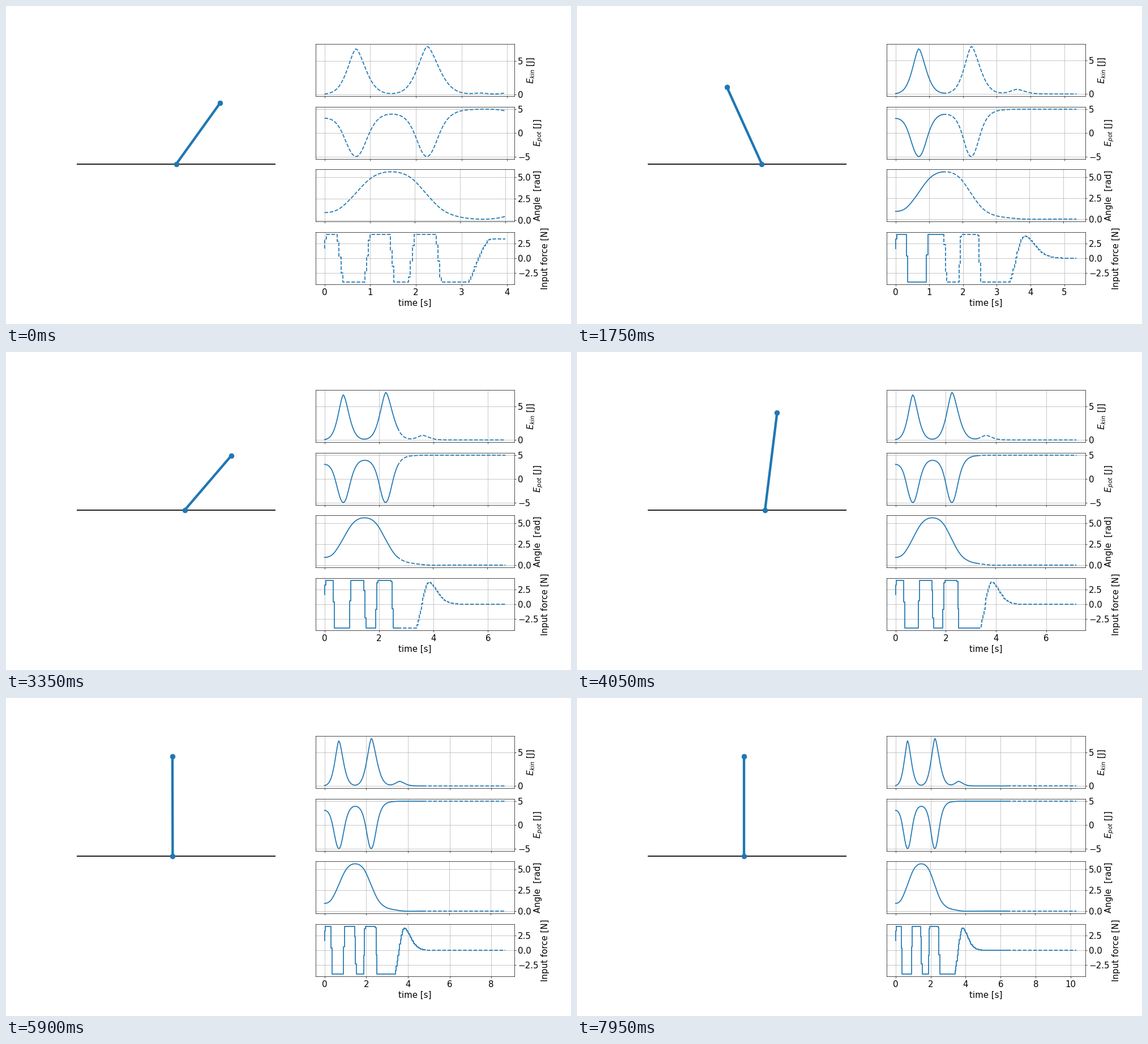
A matplotlib script that plays this animation: 998 px wide and 561 px high, repeating every 8000 ms.

```python
import numpy as np
import matplotlib.pyplot as plt
from matplotlib.animation import FuncAnimation

W, H, DPI = 998, 561, 64
K = 62.375 / DPI                 # the layout is sized for a 16 inch wide sheet
STEP, HORIZON, FRAMES = 0.04, 100, 160
BLUE = "#1f77b4"
TOP_ENERGY = 5.0
MAX_FORCE = 4.0
SWITCHES = (0.363, 0.955, 1.5, 1.928, 2.513)

plt.rcParams.update({
    "font.family": "DejaVu Sans",
    "axes.labelsize": 17.28 * K,
    "axes.labelpad": 4.5 * K,
    "axes.linewidth": 0.8 * K,
    "grid.linewidth": 0.8 * K,
    "xtick.labelsize": 17.28 * K,
    "ytick.labelsize": 17.28 * K,
    "xtick.major.pad": 4.5 * K,
    "ytick.major.pad": 3.5 * K,
})
for side in ("xtick", "ytick"):
    plt.rcParams[side + ".major.size"] = 3.5 * K
    plt.rcParams[side + ".major.width"] = 0.8 * K

# key poses: time, value, rate
ANGLE = [(0, .915, 0), (.385, 1.571, 4.2), (.69, 3.142, 5.7),
         (.985, 4.715, 4.2), (1.47, 5.61, 0), (1.92, 4.88, -3.9),
         (2.24, 3.142, -5.85), (2.525, 1.571, -4.6), (2.9, .53, -1.55),
         (3.4, .15, -.45), (4, -.018, -.02), (5, 0, 0)]
CART = [(0, 0, 0), (.69, .255, .9), (.88, .364, 0), (1.33, .26, 0),
        (1.84, .372, 0), (2.24, .21, -.85), (2.47, .09, 0), (3.1, .335, 0),
        (3.6, .175, -.65), (4.4, -.066, 0), (5, -.06, 0)]


def through(poses, t):
    """Cubic Hermite curve through the key poses."""
    p, v, m = np.array(poses).T
    t = np.clip(t, p[0], p[-1])
    i = np.clip(np.searchsorted(p, t) - 1, 0, len(p) - 2)
    h = p[i + 1] - p[i]
    s = (t - p[i]) / h
    return ((1 + 2 * s) * (1 - s) ** 2 * v[i] + s * (1 - s) ** 2 * h * m[i]
            + s * s * (3 - 2 * s) * v[i + 1] + s * s * (s - 1) * h * m[i + 1])


def bump(t, centre, height, left, right):
    width = np.where(t < centre, left, right)
    return height * np.exp(-(np.abs(t - centre) / width) ** 1.6)


def rise(t, start, length):
    p = np.clip((t - start) / length, 0, 1)
    return 1 - (1 - p ** 1.4) ** 2


def force_at(t, early):
    """Bang-bang force, softer in early plans, then a balancing push."""
    width = 0.07 + 0.05 * early
    u = np.minimum(MAX_FORCE, 1.65 + 40 * t)
    for k, centre in enumerate(SWITCHES):
        turn = np.clip((t - centre) / width + 0.5, 0, 1)
        u = u - (-1) ** k * 2 * MAX_FORCE * turn
    fade = np.exp(-(np.maximum(t - 3.86, 0) / 0.42) ** 1.7)
    push = (7.78 * rise(t, 3.4, 0.46) - MAX_FORCE) * fade
    early_push = 7.25 * rise(t, 3.16, 0.52) - MAX_FORCE
    last = (1 - early) * push + early * early_push
    return np.where(t < 3, u, last)


def plan_at(t, early):
    """Energies, angle and force as planned; early=0 is what really happens."""
    angle = through(ANGLE, t) + early * (np.clip(t, 3.3, 4.1) - 3.3) ** 2
    swings = bump(t, .69, 6.8, .264, .295) + bump(t, 2.25, 7.15, .299, .355)
    wobble = bump(t, 3.6, .7, .28, .33)
    early_wobble = bump(t, 3.4, .2, .2, .25) + bump(t, 4.1, .4, .2, .2)
    kinetic = swings + (1 - early) * wobble + early * early_wobble
    return [kinetic, TOP_ENERGY * np.cos(angle), angle, force_at(t, early)]


T = np.arange(FRAMES + HORIZON + 1) * STEP
done = plan_at(T, 0)
cart = through(CART, T)

fig = plt.figure(figsize=(W / DPI, H / DPI), dpi=DPI, facecolor="white")
grid = fig.add_gridspec(4, 2, left=.125, right=.9, top=.88, bottom=.125)

stage = fig.add_subplot(grid[:, 0])
stage.set(xlim=(-1.8, 1.8), ylim=(-1.2, 1.2))
stage.axis("off")
stage.axhline(0, color="black", lw=2 * K)
rod, = stage.plot([], [], "o-", color=BLUE, lw=5 * K, ms=10 * K, mew=K)

panels = [
    (r"$E_{kin}$ [J]", [0, 5], "default"),
    (r"$E_{pot}$ [J]", [-5, 0, 5], "default"),
    ("Angle  [rad]", [0, 2.5, 5], "default"),
    ("Input force [N]", [-2.5, 0, 2.5], "steps-pre"),
]
axes, solid, dashed = [], [], []
for row, (label, ticks, style) in enumerate(panels):
    ax = fig.add_subplot(grid[row, 1])
    ax.yaxis.tick_right()
    ax.yaxis.set_label_position("right")
    ax.set_ylabel(label)
    ax.set_yticks(ticks)
    ax.grid(True)
    ax.tick_params(axis="x", labelbottom=row == 3)
    look = dict(color=BLUE, lw=2 * K, drawstyle=style)
    solid += ax.plot([], [], "-", **look)
    dashed += ax.plot([], [], "--", **look)
    axes.append(ax)
axes[3].set_xlabel("time [s]")


def padded(low, high):
    pad = 0.05 * (high - low)
    return low - pad, high + pad


def draw(n):
    plan = plan_at(T, np.exp(-5 * T[n]))
    for i, ax in enumerate(axes):
        end = n + HORIZON + (i == 2)     # the angle has one more planned point
        past, ahead = done[i][:n + 1], plan[i][n:end]
        solid[i].set_data(T[:n + 1], past)
        dashed[i].set_data(T[n:end], ahead)
        ax.set_xlim(padded(0, T[end - 1]))
        ax.set_ylim(padded(min(past.min(), ahead.min()),
                           max(past.max(), ahead.max())))
    x, a = cart[n], done[2][n]
    rod.set_data([x, x + np.sin(a)], [0, np.cos(a)])
    return [rod, *solid, *dashed]


anim = FuncAnimation(fig, draw, frames=FRAMES, interval=50,
                     init_func=lambda: draw(0), repeat=True,
                     repeat_delay=0, blit=False)
plt.show()
```
